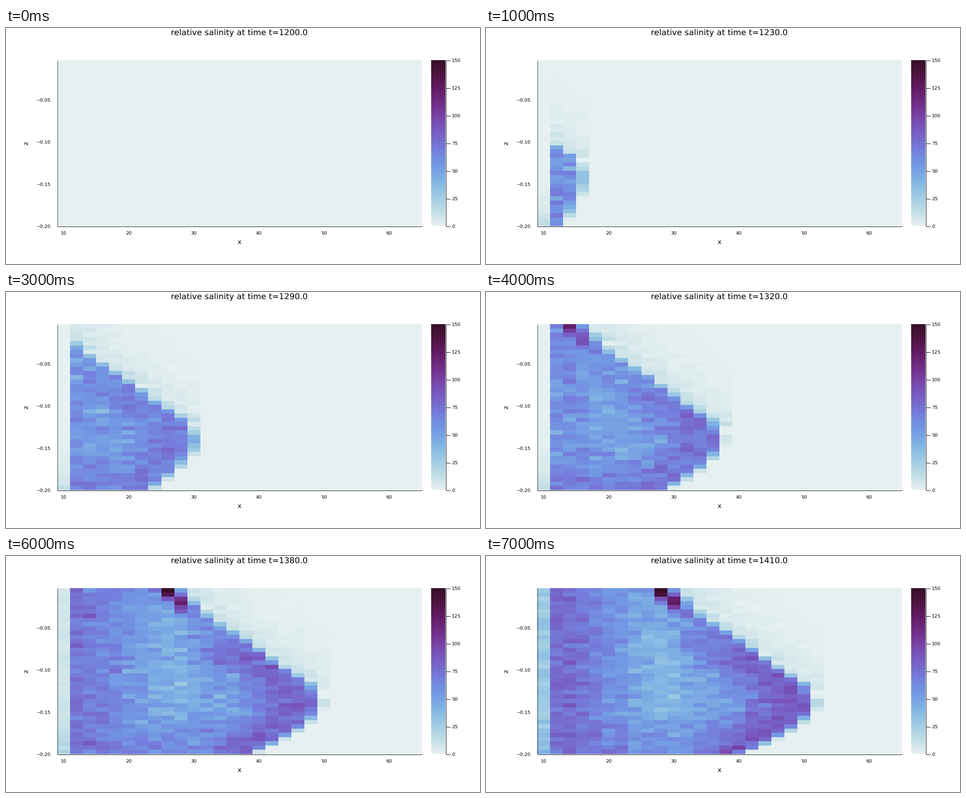
A matplotlib script that plays this animation: 1058 by 529 pixels, repeating every 8000 ms.

```python
import numpy as np
import matplotlib.pyplot as plt
from matplotlib.animation import FuncAnimation
from matplotlib.colors import LinearSegmentedColormap

W, H, DPI = 1058, 529, 100
LEFT, RIGHT, TOP, BOTTOM = 114, 928, 72, 444
N_COLS, N_ROWS, V_MAX = 28, 39, 150
SMALL, MEDIUM, LARGE = 10.5, 14.45, 18.35
plt.rcParams.update({"font.family": "DejaVu Sans", "text.hinting": "none"})

DENSE = LinearSegmentedColormap.from_list("dense", [
    "#e6f0f0", "#bfdde5", "#9cc9e2", "#81b4e3", "#739ae4", "#757fdd",
    "#7864ca", "#774aaf", "#71328d", "#641f68", "#501442", "#360e24"])

row, col = np.mgrid[:N_ROWS, :N_COLS]


def bump(x, centre, width):
    return np.exp(-((x - centre) / width) ** 2)


def plume_front(step):
    """Tip of the plume and, for every row, the column its edge reaches."""
    tip = 3.53 * step - 0.13 * max(0, step - 4) ** 3
    r = np.arange(N_ROWS)
    upper_lag = np.interp(r, [0, 6, 12, 18, 22, 26], [10.3, 8.5, 5.4, 2.9, 0.7, 0])
    lower_lag = 5 * (tip / 20) ** 0.6 * (np.clip(r - 27, 0, None) / 11) ** 1.6
    return tip, tip - upper_lag - lower_lag


def salinity(step):
    if step == 0:
        return np.zeros((N_ROWS, N_COLS))
    rng = np.random.default_rng(step)
    tip, front = plume_front(step)
    depth = front[:, None] - col

    # Dense water gathers behind the edge, on the floor and at the inflow
    edge = (6 + 4.3 * step) * bump(depth, 2, 3.5) * np.clip((row - 6) / 10, 0.2, 1)
    floor = 17 * np.clip((row - 27) / 9, 0, 1)
    inflow = 0.6 * step ** 2 * bump(col, 1, 4)
    trough = 2.2 * max(0, step - 2) * bump(col, 0.43 * tip, 2.2)
    surge = 125 * (1 - np.exp(-max(0, step - 3) / 1.8))
    head = surge * bump(depth, 1.9, 0.7) * bump(row, 0, 5)
    body = 50 + np.maximum.reduce([edge, floor, inflow]) - trough + head
    body += rng.normal(0, 6, body.shape)
    field = body * np.clip(depth, 0, 1)

    # Thin mixed water ahead of the upper edge
    ahead = (depth <= 0) & (depth > -7) & (row < 24) & (col < tip)
    haze = (12 * np.exp(depth / 1.2) + 4 * np.exp(depth / 6)) * rng.uniform(0.3, 1, field.shape)
    field = np.where(ahead, haze, field)

    inlet = 28 * (step / 7) ** 8 + 12 * (np.arange(N_ROWS) / (N_ROWS - 1)) ** 8
    field[:, 0] = inlet * rng.uniform(0.75, 1.2, N_ROWS)
    return field


fig = plt.figure(figsize=(W / DPI, H / DPI), dpi=DPI, facecolor="white")
ax = fig.add_axes([0, 0, 1, 1])
ax.axis("off")


def label(x, y, text, px, **kw):
    return ax.text(x, y, text, fontsize=px * 72 / DPI, color="black",
                   **{"ha": "center", "va": "baseline", **kw})


def line(xs, ys, width=1):
    """Thin rule through pixel centres."""
    ax.plot(np.add(xs, 0.5), np.add(ys, 0.5), color="black", lw=width * 72 / DPI,
            solid_capstyle="butt", zorder=3)


def image(data, box):
    return ax.imshow(data, cmap=DENSE, vmin=0, vmax=V_MAX, extent=box,
                     interpolation="nearest", aspect="auto")


heat = image(salinity(0), (LEFT, RIGHT, BOTTOM, TOP))
image(np.linspace(V_MAX, 0, 256)[:, None], (949, 981, BOTTOM, TOP))

line([LEFT, RIGHT], [BOTTOM, BOTTOM])
line([LEFT, LEFT], [TOP, BOTTOM], 0.7)
for value in range(10, 61, 10):
    x = LEFT + (value - 9) / 56 * (RIGHT - LEFT)
    line([x, x], [BOTTOM, BOTTOM - 1], 0.7)
    label(x, 462.5, str(value), SMALL)
for i in range(1, 5):
    y = BOTTOM - (4 - i) * 94.4
    line([LEFT, LEFT + 1], [y, y], 0.7)
    label(100, y + 4, f"\u2212{0.05 * i:.2f}", SMALL, ha="right")

line([981, 981], [TOP, BOTTOM])
for value in range(0, V_MAX + 1, 25):
    y = BOTTOM - value / V_MAX * (BOTTOM - TOP)
    line([981, 991.5], [y, y])
    label(995, y + 4, str(value), SMALL, ha="left")

label(521, 484, "x", MEDIUM)
label(45.5, 258, "z", MEDIUM, rotation=90, va="center")
title = label(521, 16, "", LARGE)
ax.set(xlim=(0, W), ylim=(H, 0))


def update(step):
    heat.set_data(salinity(step))
    title.set_text(f"relative salinity at time t={1200 + 30 * step:.1f}")
    return heat, title


anim = FuncAnimation(fig, update, frames=8, interval=1000, repeat=True, repeat_delay=0)
plt.show()
```
